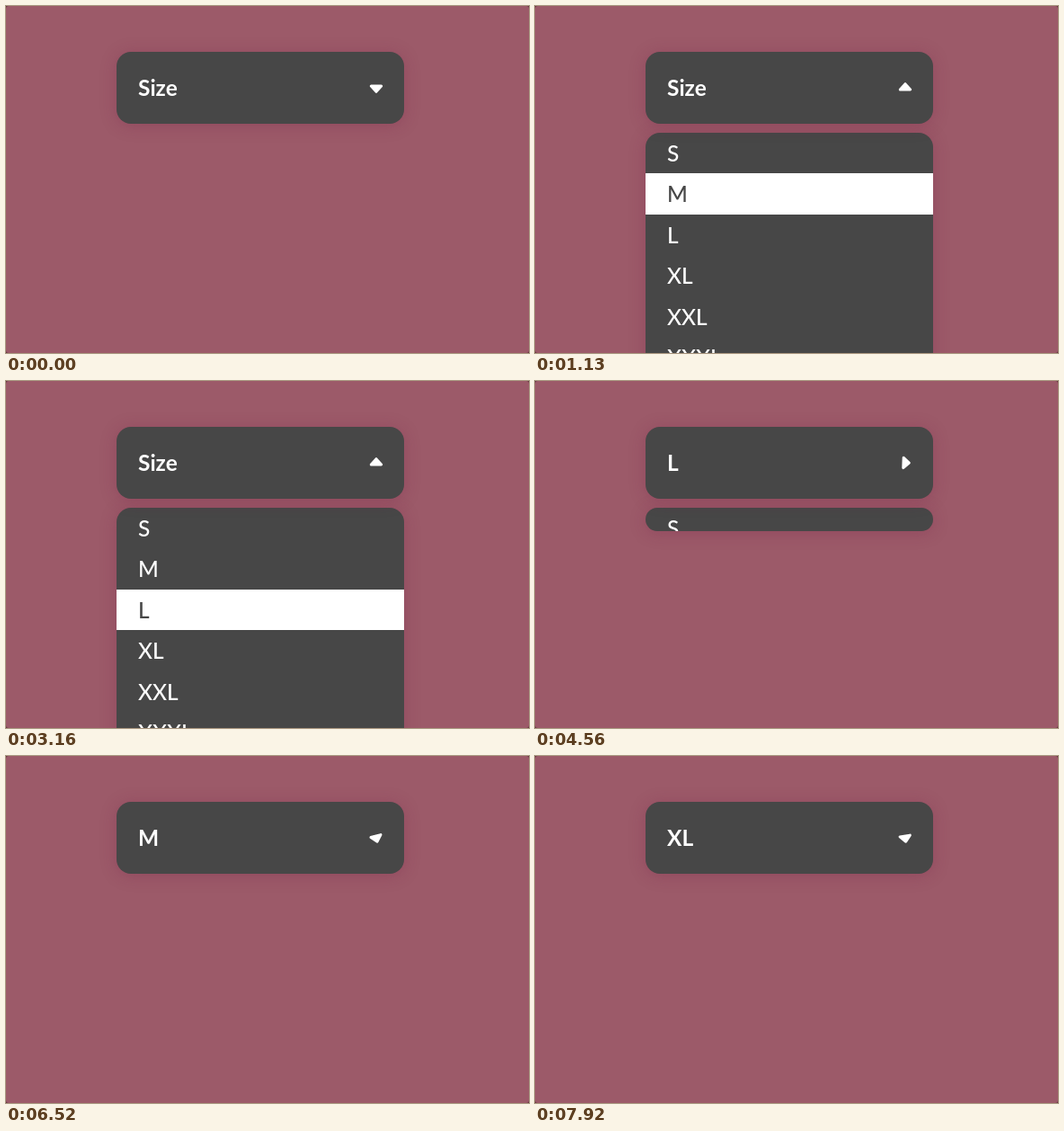
An HTML page for the animation above (7990 ms loop, 582 by 386 pixels).

```html
<!DOCTYPE html>
<html lang="en">
<head>
<meta charset="utf-8">
<title>Size dropdown</title>
<style>
  html, body { margin: 0; width: 100%; height: 100%; overflow: hidden; background: #5f333c; }
  .stage {
    position: relative; width: 582px; height: 386px; overflow: hidden;
    border-radius: 3px; background: #9c5a69;
    font: 500 24.5px/1 Lato, sans-serif; color: #fff;
  }
  .box {
    position: absolute; left: 123px; width: 320px; overflow: hidden;
    border-radius: 16px; background: #474747;
    box-shadow: 0 2px 18px rgba(120, 30, 70, .28);
  }
  .head { top: 51px; height: 80px; font-weight: 700; }
  .label { position: absolute; left: 24px; top: 0; line-height: 80px; }
  .arrow { position: absolute; left: 278.5px; top: 30.2px; width: 20px; height: 20px; }
  .arrow path { fill: #fff; stroke: #fff; stroke-width: 3; stroke-linejoin: round; }
  .list { top: 140.5px; height: 0; }
  .row { height: 45.6px; line-height: 45.6px; padding-left: 24px; }
  .row.on { background: #fff; color: #474747; }
</style>
</head>
<body>
<div class="stage">
  <div class="box list"></div>
  <div class="box head">
    <span class="label">Size</span>
    <svg class="arrow" viewBox="-10 -10 20 20"><path d="M-5.7 -2H5.7L0 4.3Z"/></svg>
  </div>
</div>
<script>
  const LOOP = 7990, STEP = 70, OFFSET = 10;
  const SIZES = ['S', 'M', 'L', 'XL', 'XXL', 'XXXL'];
  const FULL = SIZES.length * 45.6;

  // [start, open, label]
  const toggles = [
    [-1000, false, 'Size'], [470, true, 'Size'], [3520, false, 'L'],
    [4490, true, 'L'], [5650, false, 'M'], [6510, true, 'M'], [7699, false, 'XL']
  ];
  // [start, hovered row]
  const hovers = [
    [0, -1], [1060, 0], [1130, 1], [1760, 2], [2110, 3], [2180, 4], [2950, 3], [3160, 2],
    [3900, -1], [4910, 0], [4980, 1], [5050, 2], [5330, 1],
    [6050, -1], [6870, 0], [6940, 1], [7010, 2], [7080, 3]
  ];

  const $ = s => document.querySelector(s);
  const list = $('.list'), label = $('.label'), arrow = $('.arrow path');
  const rows = SIZES.map(size => {
    const row = document.createElement('div');
    row.className = 'row';
    row.textContent = size;
    return list.appendChild(row);
  });

  const at = (track, t) => track.findLast(e => e[0] <= t);
  const part = (t, length) => Math.min(1, t / length);
  const easeOut = x => 1 - (1 - x) ** 3;
  const swing = x => (1 - Math.cos(Math.PI * x)) / 2;

  function draw(t) {
    const [start, open, text] = at(toggles, t);
    const turn = easeOut(part(t - start, 350));
    const slide = swing(part(t - start, open ? 350 : 220));
    const height = FULL * (open ? slide : 1 - slide);
    const hovered = at(hovers, t)[1];

    label.textContent = text;
    arrow.setAttribute('transform', `rotate(${-180 * (open ? turn : 1 - turn)})`);
    list.style.height = height + 'px';
    list.style.visibility = height < 1 ? 'hidden' : 'visible';
    rows.forEach((row, i) => row.classList.toggle('on', i === hovered));
  }

  function tick() {
    const t = performance.now() % LOOP;
    draw(Math.max(0, Math.floor((t - OFFSET) / STEP) * STEP + OFFSET));
    requestAnimationFrame(tick);
  }
  tick();
</script>
</body>
</html>
```
